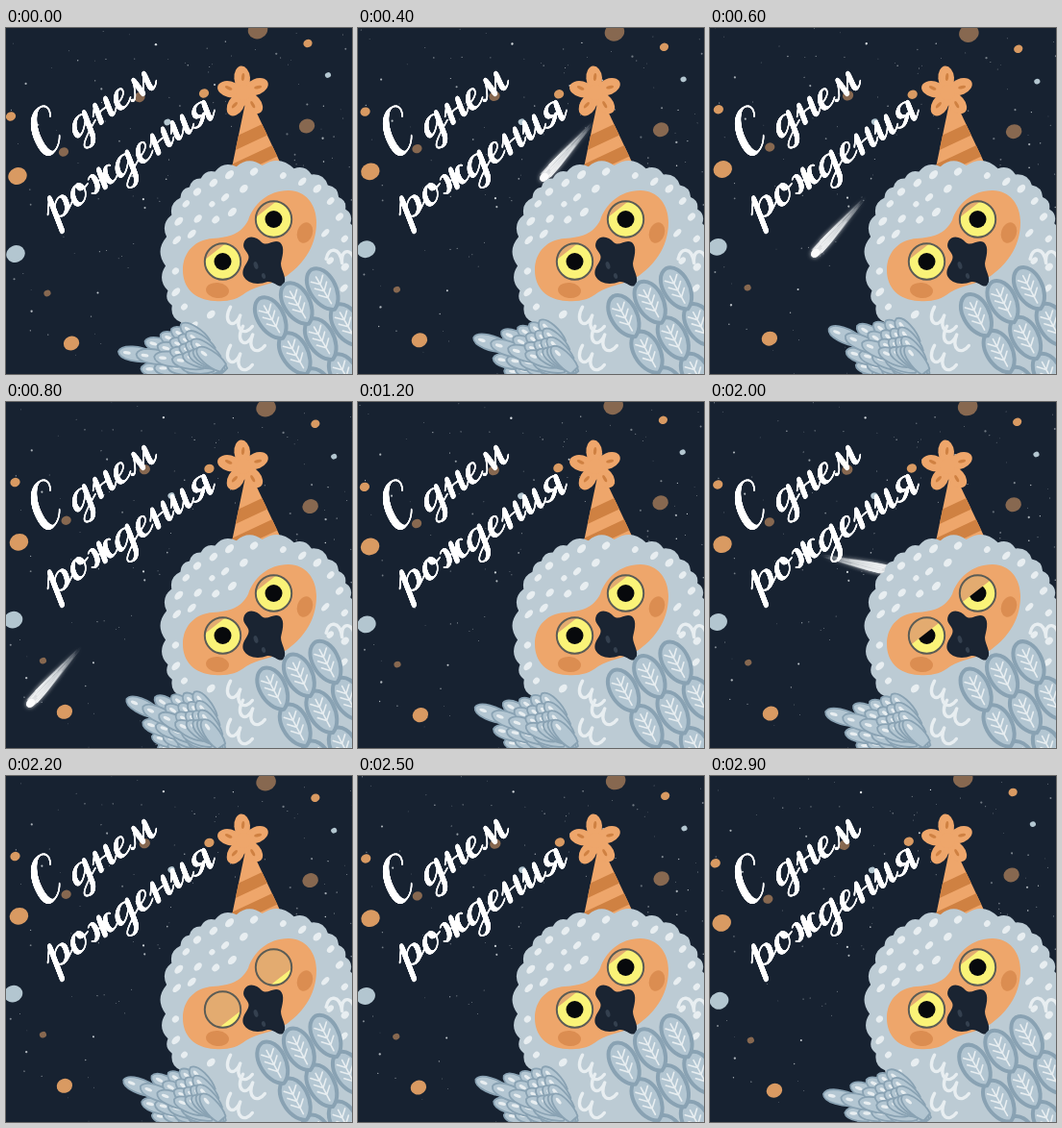
Recreate the animation shown at these times as an HTML page with a canvas. Size 360x360 px, loop 3 s.

```html
<!DOCTYPE html>
<html lang="ru">
<head>
<meta charset="utf-8">
<title>С днем рождения</title>
<style>
html, body { margin: 0; width: 100%; height: 100%; overflow: hidden; background: #172231; }
canvas { display: block; width: 360px; height: 360px; }
</style>
</head>
<body>
<canvas id="stage" role="img" aria-label="С днем рождения"></canvas>
<script>
const SIZE = 360, LOOP = 3000, BEAT = LOOP / 2, STEP = 100;
const C = {
  night: '#172231', body: '#bccbd4', pale: '#e8eef1', line: '#89a2b3', feather: '#b3c6d2',
  mask: '#eea66b', rust: '#db8d51', stripe: '#cf8142', iris: '#faf378', ring: '#5b5c55',
  lid: '#e3ab70', beak: '#1a2432', nostril: '#34404f',
  brown: '#876850', sky: '#b3c6d0', orange: '#d99a62'
};
const dpr = window.devicePixelRatio || 1;

function prep(canvas) {
  canvas.width = canvas.height = SIZE * dpr;
  const g = canvas.getContext('2d');
  g.scale(dpr, dpr);
  g.lineCap = g.lineJoin = 'round';
  return g;
}
function layer(draw) {
  const canvas = document.createElement('canvas');
  draw(prep(canvas));
  return canvas;
}
function random(seed) {
  return () => (seed = (seed * 16807) % 2147483647) / 2147483647;
}
function fill(g, d, color) {
  g.fillStyle = color;
  g.fill(new Path2D(d));
}
function stroke(g, d, color, width) {
  g.strokeStyle = color;
  g.lineWidth = width;
  g.stroke(new Path2D(d));
}
function oval(g, x, y, rx, ry, turn, color) {
  g.beginPath();
  g.ellipse(x, y, rx, ry, turn, 0, 7);
  g.fillStyle = color;
  g.fill();
}
function at(g, x, y, turn, draw) {
  g.save();
  g.translate(x, y);
  g.rotate(turn);
  draw();
  g.restore();
}
const rad = deg => deg * Math.PI / 180;

// Night sky
const flakes = {
  orange: [[12, 154, 9.5], [68, 328, 8], [206, 68, 5], [5, 92, 5], [314, 16, 4.5]],
  brown: [[262, 2, 10], [313, 102, 8], [139, 72, 5.5], [60, 129, 5], [43, 276, 3.5]],
  sky: [[10, 235, 9.5], [168, 98, 3.5], [335, 49, 3]]
};
function drawSky(g, turn) {
  const rnd = random(77);
  g.fillStyle = C.night;
  g.fillRect(0, 0, SIZE, SIZE);
  at(g, 180, 180, turn, () => {
    for (let i = 0; i < 210; i++) {
      const r = 0.4 + rnd() ** 3 * 0.8;
      g.globalAlpha = 0.35 + rnd() * 0.6;
      oval(g, rnd() * 400 - 200, rnd() * 400 - 200, r, r, 0, '#e4eaed');
    }
    g.globalAlpha = 1;
    for (const color in flakes)
      for (const [x, y, r] of flakes[color])
        oval(g, x - 180, y - 180, r * 1.04, r * 0.92, -0.4, C[color]);
  });
}

// Shooting star: head at x, y, tail trailing along the given angle
function drawComet(g, x, y, angle, len) {
  const rnd = random(31);
  at(g, x, y, angle, () => {
    const fade = g.createLinearGradient(-4, 0, len, 0);
    fade.addColorStop(0, 'rgba(255,255,255,.9)');
    fade.addColorStop(0.45, 'rgba(230,234,236,.5)');
    fade.addColorStop(1, 'rgba(210,216,220,0)');
    g.shadowColor = 'rgba(255,255,255,.5)';
    g.shadowBlur = 4 * dpr;
    fill(g, `M-4,0 C-4,-7 14,-6 ${len},-1 L${len},1 C14,6 -4,7 -4,0Z`, fade);
    for (let i = 0; i < 16; i++) {
      const side = (rnd() - 0.5) * 10, start = rnd() * 22, end = len * (0.45 + rnd() * 0.55);
      stroke(g, `M${start},${side} Q${end / 2},${side} ${end},${side * 0.4}`, fade, 0.6 + rnd());
    }
    oval(g, 1, 0, 5, 4, 0, 'rgba(255,255,255,.8)');
  });
}

// Brush lettering: falling strokes are heavy, rising ones are hairlines
const glyphs = {
  С: ['M21,-35 C25,-44 19,-50 13,-49 C2,-47 -2,-30 1,-14 C3,-3 8,0 13,-2 C18,-4 21,-8 23,-13'],
  д: ['M16,-17 C8,-23 0,-14 0,-7 C0,2 7,2 16,-14', 'M16,-20 L16,4 C16,14 10,17 5,14 C0,10 10,3 25,-6'],
  н: ['M-2,-10 L4,-20', 'M4,-20 L4,0', 'M4,-8 C9,-13 14,-9 17,-13', 'M17,-20 L17,-5 C17,1 21,1 25,-6'],
  е: ['M0,-7 C9,-9 13,-14 11,-18 C8,-22 1,-17 1,-8 C1,2 10,2 17,-6'],
  м: ['M-1,-2 C2,1 5,-2 8,-20', 'M8,-20 L13,-1 C15,-6 18,-14 21,-20', 'M21,-20 L22,-5 C23,2 28,0 31,-6'],
  р: ['M-5,-9 L3,-24', 'M3,-24 L3,14', 'M3,-8 C7,-20 18,-22 18,-11 C18,1 8,2 5,-2', 'M9,0 C14,2 20,-4 26,-8'],
  о: ['M10,-19 C3,-20 0,-13 0,-8 C0,2 8,2 12,-3 C17,-10 14,-19 9,-19 C9,-12 14,-11 20,-14'],
  ж: ['M1,-17 C6,-22 8,-16 8,-10 C8,-2 3,1 -1,-3', 'M15,-21 L15,0', 'M8,-10 L22,-10',
    'M28,-17 C23,-22 20,-14 20,-10 C20,0 26,2 33,-6'],
  и: ['M-2,-10 L3,-20', 'M3,-20 L3,-6 C3,2 9,1 15,-14', 'M15,-20 L15,-6 C15,1 19,1 24,-6'],
  я: ['M17,-20 C8,-24 2,-17 4,-12 C6,-8 13,-8 17,-9', 'M13,-9 C8,-3 4,2 -2,-2', 'M17,-20 L17,-4 C17,1 20,1 25,-6']
};
// Draws one stroke and returns the x where it ends
function brush(g, d, heavy) {
  const path = document.createElementNS('http://www.w3.org/2000/svg', 'path');
  path.setAttribute('d', d);
  const total = path.getTotalLength(), gap = 0.6;
  let last = path.getPointAtLength(0), width = 2;
  for (let s = gap; s <= total; s += gap) {
    const p = path.getPointAtLength(s);
    const goal = 1.7 + heavy * Math.max(0, (p.y - last.y) / gap) ** 1.3;
    width += (goal - width) * 0.4;
    g.lineWidth = width;
    g.beginPath();
    g.moveTo(last.x, last.y);
    g.lineTo(p.x, p.y);
    g.stroke();
    last = p;
  }
  return last.x;
}
function write(g, x, y, text) {
  g.save();
  g.transform(0.84, -0.545, 0.36, 0.93, x, y);
  g.strokeStyle = '#fff';
  for (const ch of text) {
    let advance = 15;
    for (const d of glyphs[ch] || []) advance = brush(g, d, ch === 'С' ? 5.8 : 3.7);
    g.translate(advance + 1, 0);
  }
  g.restore();
}
const lettering = layer(g => {
  write(g, 41, 136, 'С днем');
  write(g, 51, 200, 'рождения');
});

// Owl: a squarish round head with a scalloped rim
const head = { x: 264, y: 241, r: 98 };
const power = (v, n) => Math.sign(v) * Math.abs(v) ** n;
function rim(deg, r = head.r) {
  const a = rad(deg), n = 2 / 2.5;
  return [head.x + r * power(Math.cos(a), n), head.y + r * power(Math.sin(a), n)];
}
function fluffy() {
  const rnd = random(12);
  let [a, b] = rim(134), d = `M${a},${b}`;
  for (let deg = 134; deg < 362;) {
    deg += 9 + rnd() * 7;
    const [x, y] = rim(deg), k = 0.4;
    d += ` Q${(a + x) / 2 + (y - b) * k},${(b + y) / 2 - (x - a) * k} ${x},${y}`;
    [a, b] = [x, y];
  }
  return d + ' L362,362 L203,362Z';
}
const mask = 'M184,252 C184,232 198,220 215,219 C232,218 245,214 252,200 C257,184 272,169 294,169 ' +
  'C312,169 323,184 323,202 C323,230 306,248 292,258 C276,268 262,267 250,275 ' +
  'C240,283 230,285 217,284 C196,283 184,270 184,252Z';
const beak = 'M248,222 C252,215 261,217 266,223 C272,228 278,219 285,223 C291,228 287,239 286,245 ' +
  'C286,252 293,260 289,267 C285,272 279,263 272,264 C262,268 251,266 247,258 C244,248 255,243 252,236 C250,231 245,229 248,222Z';

function drawHat(g) {
  g.save();
  g.clip(new Path2D('M249,78 L256,78 L290,150 L234,150Z'));
  fill(g, 'M230,70 H292 V152 H230Z', C.mask);
  for (let y = 104; y < 170; y += 27)
    fill(g, `M230,${y + 13} l62,-29 v14 l-62,29Z`, C.stripe);
  g.restore();
  for (let deg = -95; deg < 265; deg += 72)
    at(g, 247, 67, rad(deg), () => {
      oval(g, 15, 0, 12.5, 8.3, 0, C.mask);
      oval(g, 16, 1, 4, 1.6, 0.2, C.stripe);
    });
  oval(g, 247, 67, 8, 8, 0, C.mask);
}
function drawSpots(g) {
  const rnd = random(5), shape = new Path2D(mask);
  g.lineWidth = 14;
  for (let r = 87; r > 30; r -= 17)
    for (let deg = 128 + r % 10; deg < 378; deg += 1150 / r) {
      const [x, y] = rim(deg + rnd() * 4, r + rnd() * 5);
      const inside = g.isPointInPath(shape, x * dpr, y * dpr) || g.isPointInStroke(shape, x * dpr, y * dpr);
      if (!inside) oval(g, x, y, 3.2 + rnd() * 2.4, 2.6 + rnd(), rad(-45), C.pale);
    }
}
function drawCurl(g, x, y, turn) {
  at(g, x, y, turn, () => stroke(g, 'M-13,-13 C-18,5 -3,10 -1,-7 C-3,10 9,13 14,1', C.pale, 3.4));
}
const owl = layer(g => {
  drawHat(g);
  fill(g, fluffy(), C.body);
  drawSpots(g);
  for (let i = 0; i < 3; i++) drawCurl(g, 243 + i % 2 * 13, 306 + i * 20, 0.25);
  drawCurl(g, 347, 238, 2.9);
  fill(g, mask, C.mask);
  oval(g, 220, 273, 12, 8, 0.1, C.rust);
  oval(g, 311, 213, 8, 11, 0.3, C.rust);
});

function drawEye(g, x, y, shut) {
  g.save();
  g.beginPath();
  g.arc(x, y, 18.5, 0, 7);
  g.clip();
  oval(g, x, y, 19, 19, 0, C.iris);
  oval(g, x, y, 9, 9, 0, '#07090c');
  at(g, x, y, rad(-38), () => {
    g.fillStyle = C.lid;
    g.fillRect(-20, -20, 40, 7 + shut * 33);
  });
  g.restore();
  g.beginPath();
  g.arc(x, y, 18.7, 0, 7);
  g.strokeStyle = C.ring;
  g.lineWidth = 2;
  g.stroke();
}

// Two rows of broad veined feathers, lower row first
function drawFeather(g, x, y) {
  at(g, x, y, rad(-30), () => {
    const d = 'M0,-24 C18,-22 18,16 0,24 C-18,16 -18,-22 0,-24Z';
    fill(g, d, C.feather);
    stroke(g, d, C.line, 4);
    let vein = 'M0,-15 L0,17';
    for (const v of [-6, 2, 10]) vein += ` M-7,${v - 7} L0,${v} L7,${v - 7}`;
    stroke(g, vein, C.pale, 1.6);
  });
}
function drawRightWing(g, turn) {
  at(g, 360, 350, turn, () => {
    for (let row = 2; row >= 0; row--)
      for (let i = 2; i >= 0; i--)
        drawFeather(g, i * 27 + row * 25 - 84, row * 37 - i * 15 - 48);
  });
}

// A pointed fan of small overlapping scales
function drawLeftWing(g, turn) {
  const scale = 'M0,0 C2,-9 24,-9 34,-5 V5 C24,9 2,9 0,0Z';
  at(g, 210, 350, turn, () => {
    for (let ring = 1; ring > 0.3; ring -= 0.2)
      for (let deg = -60; deg <= 48; deg += 12) {
        const reach = ring * (48 + 46 * Math.exp(-Math.abs(deg) / 16)), a = rad(deg);
        at(g, -reach * Math.cos(a), -reach * Math.sin(a), a * 0.6, () => {
          fill(g, scale, C.feather);
          stroke(g, scale, C.line, 1.8);
          oval(g, 9, 0, 4, 1.7, 0, C.pale);
        });
      }
  });
}

// Timing
const ctx = prep(document.getElementById('stage'));

function render(t) {
  const swing = 1 - Math.abs(t % BEAT / (BEAT / 2) - 1);
  const flap = 4 + 20 * Math.abs(Math.sin(Math.PI * (t - 100) / BEAT)) + 2 * Math.sin(2 * Math.PI * t / LOOP);
  const shut = Math.max(0, 1 - Math.abs(t - 2150) / 220);
  const put = img => ctx.drawImage(img, 0, 0, SIZE, SIZE);
  drawSky(ctx, rad(3) * swing);
  if (t > 0 && t < 1100) drawComet(ctx, 361 - 0.42 * t, -2 + 0.395 * t, rad(-48), 80);
  if (t > 1600 && t < 2300) drawComet(ctx, 190 + 0.56 * (t - 2000), 176 + 0.125 * (t - 2000), rad(192.5), 78);
  put(lettering);
  put(owl);
  drawLeftWing(ctx, rad(flap));
  drawEye(ctx, 225.5, 243, shut);
  drawEye(ctx, 278.5, 199, shut);
  fill(ctx, beak, C.beak);
  oval(ctx, 260, 247, 2.2, 4, -0.3, C.nostril);
  oval(ctx, 268, 258, 2, 3, -0.3, C.nostril);
  drawRightWing(ctx, rad(2.5) * swing);
}

function tick() {
  render(Math.floor(performance.now() / STEP + 1e-6) * STEP % LOOP);
  requestAnimationFrame(tick);
}
tick();
</script>
</body>
</html>
```
